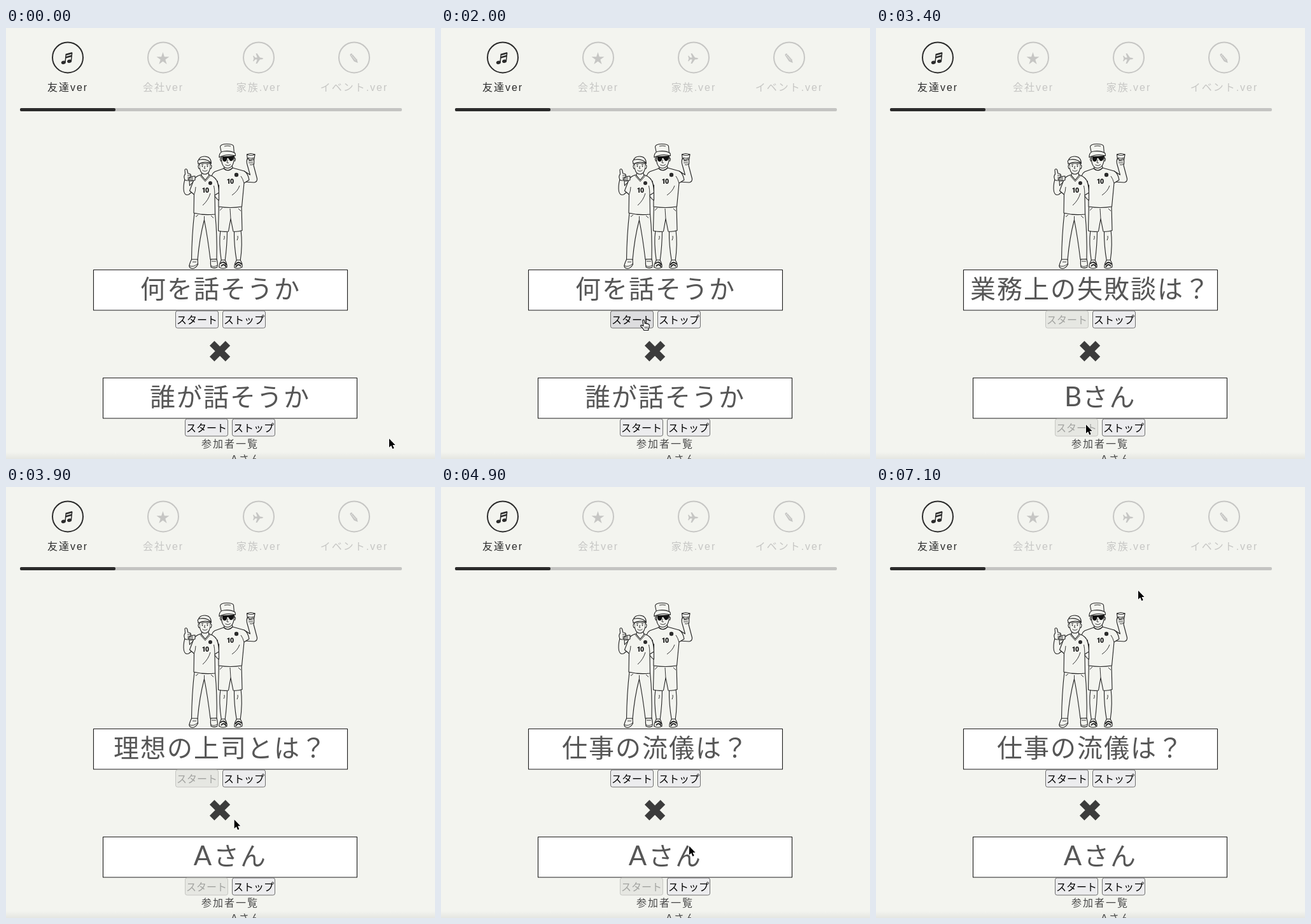
An HTML page with a canvas for the animation above (7.3 s loop, 674 by 678 pixels).

```html
<!DOCTYPE html>
<html lang="ja">
<head>
<meta charset="utf-8">
<title>Talk roulette</title>
<style>
html, body { margin: 0; width: 100%; height: 100%; overflow: hidden; background: #f3f4ef; }
canvas { display: block; }
</style>
</head>
<body>
<canvas id="stage" width="674" height="678"></canvas>
<script>
const ctx = document.getElementById('stage').getContext('2d');
const LOOP = 7300, STEP = 100;
const BG = '#f3f4ef', INK = '#2b2b2b', PALE = '#c6c6c4';
const CJK = '"Noto Sans CJK JP", "Noto Sans CJK", sans-serif';
const MIXED = '"Liberation Sans", ' + CJK;

const TOPICS = ['理想の上司とは？', '業務上の失敗談は？', '仕事の流儀は？'];
const TOP = { start: 2100, stop: 4500 };
const LOW = { start: 3200, stop: 6100 };

// Pointer stops: time, x, y
const TRACK = [
  [0, 602, 646], [300, 602, 646], [400, 603, 647], [500, 603, 647], [600, 603, 648],
  [900, 603, 648], [1000, 596, 643], [1200, 520, 590], [1400, 405, 514], [1700, 321, 474],
  [1800, 319, 465], [1900, 318, 459], [2200, 318, 459], [2500, 325, 487], [2600, 331, 520],
  [2700, 335, 555], [2800, 336, 588], [2900, 333, 612], [3100, 330, 624], [3500, 330, 624],
  [3700, 340, 590], [4000, 368, 490], [4200, 376, 463], [4500, 376, 463], [4700, 383, 493],
  [4900, 390, 565], [5000, 391, 600], [5200, 391, 625], [6800, 391, 625], [6900, 393, 575],
  [7000, 402, 380], [7100, 412, 163], [LOOP, 412, 163]
];

function pointerAt(t) {
  const i = Math.max(1, TRACK.findIndex(k => k[0] >= t));
  const [t0, x0, y0] = TRACK[i - 1], [t1, x1, y1] = TRACK[i];
  const p = (t - t0) / (t1 - t0);
  return { x: x0 + (x1 - x0) * p, y: y0 + (y1 - y0) * p };
}

function text(str, x, y, size, color, opt = {}) {
  ctx.font = `${opt.weight || 400} ${size}px ${opt.family || CJK}`;
  ctx.letterSpacing = (opt.gap || 0) + 'px';
  ctx.textAlign = 'left';
  ctx.fillStyle = color;
  const left = opt.left ? x : x - ctx.measureText(str).width / 2;
  ctx.fillText(str, left, y);
}

function line(d, width = 1.1, color = '#222', fill) {
  const p = new Path2D(d);
  if (fill) { ctx.fillStyle = fill; ctx.fill(p); }
  ctx.lineWidth = width;
  ctx.strokeStyle = color;
  ctx.stroke(p);
}

const shape = d => line(d, 1.1, '#222', BG);

function solid(d, color) {
  ctx.fillStyle = color;
  ctx.fill(new Path2D(d));
}

function ellipse(x, y, rx, ry, color, angle = 0) {
  ctx.beginPath();
  ctx.ellipse(x, y, rx, ry, angle, 0, Math.PI * 2);
  ctx.fillStyle = color;
  ctx.fill();
}

function roundBox(x, y, w, h, r, fill, stroke) {
  ctx.beginPath();
  ctx.roundRect(x, y, w, h, r);
  ctx.fillStyle = fill;
  ctx.fill();
  if (stroke) { ctx.lineWidth = 1; ctx.strokeStyle = stroke; ctx.stroke(); }
}

// --- Header tabs ---
const ICONS = [
  c => {
    ellipse(90.3, 54.3, 3.6, 2.6, c, -0.3);
    ellipse(99.6, 52.3, 3.6, 2.6, c, -0.3);
    line('M93 54L94.3 41M102.4 52L103.7 38.8', 1.5, c);
    line('M94 42L104 39.2M93.6 46.5L103.2 43.7', 2.5, c);
  },
  c => {
    ctx.beginPath();
    for (let i = 0; i < 10; i++) {
      const a = i * Math.PI / 5 - Math.PI / 2, r = i % 2 ? 4 : 10.5;
      ctx.lineTo(246.5 + r * Math.cos(a), 48.5 + r * Math.sin(a));
    }
    ctx.fillStyle = c;
    ctx.fill();
  },
  c => solid('M404.5 48Q403 46.4 399 46.4L394.5 40H392.5L394.7 46.4H391.5L389.3 43.8H388L389.4 48L388 52.2H389.3L391.5 49.6H394.7L392.5 56H394.5L399 49.6Q403 49.6 404.5 48Z', c),
  c => {
    solid('M540.5 43Q540 40.5 543 40L551.3 48.8L552.8 55L546.8 52.5Z', c);
    line('M542 44L545 41.2M543.8 44.3L549.2 50.8M546 42.8L551 49', 0.8, BG);
  }
];

function header() {
  ['友達ver', '会社ver', '家族.ver', 'イベント.ver'].forEach((label, i) => {
    const x = 97 + i * 150, c = i ? PALE : INK;
    ctx.beginPath();
    ctx.arc(x, 46.4, 24, 0, Math.PI * 2);
    ctx.lineWidth = 2;
    ctx.strokeStyle = c;
    ctx.stroke();
    ICONS[i](c);
    text(label, x, 99, 16, c, { gap: 2, family: MIXED, weight: 500 });
  });
  roundBox(22, 126, 600, 5, 2, '#c4c4c2');
  roundBox(22, 126, 150, 5, 2, INK);
}

// --- Line drawing of two friends ---
function tallFriend() {
  // legs, sandals, shorts
  shape('M337 318Q334 338 338.5 367H344Q347.5 342 347.5 318Z');
  shape('M358.5 318Q358 342 362.5 367H368Q372 340 369 318Z');
  shape('M338.5 365Q334 373 335 376.5Q341 380 347 376.5Q348 372 344 365Z');
  shape('M362.5 365Q358 372 359 377Q365 380 371 376Q372 371 368 365Z');
  line('M336.5 371Q342 365 346.5 373M338 375Q342 369 346 376M360 373Q365 365 370.5 372M361 376Q365 369 369 375', 1.8);
  line('M343 327Q344 331 342 333M364 327Q365 330 363 334', 0.9);
  shape('M334.5 280L333.5 319Q341 321 349.5 320L353 300L357 320Q364 321 371 318.5L370 280Z');
  line('M353 300L352 284M336 287L340 283M369 288L365 284', 0.9);
  // raised arm and cup
  shape('M378.5 199L380 212Q385 214 389 212L391 199Z');
  shape('M378.5 199Q384 196 391 199Q385 201.5 378.5 199Z');
  line('M379.3 204Q385 206 390.3 204', 0.9);
  shape('M374 225L383.5 231L379 215Q377 208 380 205L383 208L388.5 206Q391 210 389 216L394.5 237Q395 242 390 243L374 242Z');
  line('M381 209H388M381 212H388.5M383 215Q386 216 389 214', 0.9);
  // shirt and head
  shape('M342 221L328 226Q321 230 322 245L334 250V281Q353 284 370.5 281L374 244L382 239Q380 228 374 225L356 220Q348 227 342 221Z');
  line('M374 244Q372 237 369 233M367 248Q364 257 355 263M334 250L332 240', 0.9);
  shape('M343 213L342.5 221Q349 227 356 220L354.5 212Z');
  shape('M338.5 198Q337 220 348 220.5Q359.5 220 358.5 198Z');
  shape('M338 204Q335 205 338 210M359 204Q362 206 359 210');
  line('M348.5 207L347 212H350M344.5 215Q349 218 353 214.5', 0.9);
  solid('M339.5 202L358 201L357.8 205Q356.5 210 352 209L349 204.5L347.5 205Q347 211 342.5 210Q339.5 209 339.5 202Z', '#111');
  shape('M339 199L336.5 187Q337 182.5 347 182.5Q357 182.5 357.5 186L358.5 198Q348 196.5 339 199Z');
  shape('M335 201Q336 194.5 342 194Q353 192.5 360 197L360.5 201Q347 197 335 203.5Z');
  line('M343 186Q348 184.5 353 186', 0.9);
  ellipse(362, 231, 3.2, 3.2, INK);
  shirtNumber(352, 244.5);
}

function shirtNumber(x, y) {
  text('10', x, y, 10.5, '#111', { weight: 900, family: 'Roboto, sans-serif', gap: -0.8 });
}

function capFriend() {
  // legs and shoes
  shape('M296 291Q292 325 291.5 365H301Q304 330 311.5 302Q317 330 321 364H331Q332 325 328.5 292Z');
  line('M311.5 302V296M298 297L302 294M326 299L322 295', 0.9);
  shape('M291.5 364Q289 369 287.8 374Q288 378 293 378.5Q298 378 301.5 372L301 364Z');
  shape('M321.5 364Q321 371 322 376Q326 379 331.5 376.5Q333.5 373 331 363.5Z');
  line('M288 374Q294 377 301 371M322 374Q327 377 332 373M293 368H299M323 367H330', 0.9);
  // raised arm with thumb
  shape('M281 238Q278 249 279.5 257Q281 264 287 262L297 254L294 242L288.5 248L288 239Z');
  shape('M281 239Q278.5 233 281.5 230L281 223Q282.5 220.5 284.5 223L286 229Q291 229 290.5 233L289 239Q285 241 281 239Z');
  line('M285 232H290.5M285 235H290M285 237.5H289', 0.9);
  // far arm, shirt
  shape('M326 261Q331 270 334.5 271V247L327 246Z');
  shape('M306 231Q298 233 295 239L288.5 256L295.5 262L295 291Q311 295 328.5 293L328 263L334.5 259Q334 241 328 236Q325 233 319 231L313 239Z');
  line('M295.5 262Q298 256 298 250M328 263Q328 254 326.5 248M321 260Q318 271 309 279', 0.9);
  // head and cap
  shape('M308 225L307 232L313 239L319 232L317 225Z');
  line('M305 232.5L313 241.5L321 232.5', 0.9);
  shape('M304 213Q303.5 229.5 312.5 230Q321.5 229.5 321 213Z');
  shape('M304 215Q301 216 302.5 220Q303 222 304.5 221M321 215Q324 216 322.5 220Q322 222 320.5 221');
  ellipse(308.5, 217.5, 0.9, 1.1, '#111');
  ellipse(316.5, 217.5, 0.9, 1.1, '#111');
  line('M312.5 217L311.5 221H313.5M308.5 223.5Q312.5 227 316.5 223.5M307 215H310M315 215H318', 0.9);
  shape('M302 212Q302 202 312 202Q322 202 322.5 213Q312 207 302 212Z');
  shape('M302 212Q299.5 208 305 207Q316 205 322.5 213Q312 208.5 302 214Z');
  ellipse(321, 244, 3, 3, INK);
  shirtNumber(313, 258.5);
  // friend's hand on the shoulder
  shape('M297 233Q290 233 287.5 236Q286 240 289 240.5Q294 241 297 239Z');
  line('M288 236L294 235M287.5 238.2L294 237.5M288.5 240.2L294 239.8', 0.9);
}

// --- Roulette panels ---
function makeButtons(x, y, run) {
  return [
    { label: 'スタート', x, y, off: t => t >= run.start && t < run.stop },
    { label: 'ストップ', x: x + 74, y, off: () => false }
  ];
}
const BUTTONS = [...makeButtons(266.5, 445, TOP), ...makeButtons(281.5, 615, LOW)];

const hovers = (b, p, t) => !b.off(t) && p.x > b.x && p.x < b.x + 67 && p.y > b.y && p.y < b.y + 27.5;

function button(b, p, t) {
  const off = b.off(t);
  const fill = off ? '#e6e7e2' : hovers(b, p, t) ? '#dddddf' : '#ececee';
  roundBox(b.x, b.y, 67, 27, 3, fill, off ? '#c6c7c3' : '#6f6f6f');
  text(b.label, b.x + 33.5, b.y + 19.5, 16, off ? '#a2a3a0' : '#000', { weight: 500 });
}

function panel(x, y) {
  ctx.fillStyle = '#fff';
  ctx.fillRect(x, y, 399, 63.5);
  ctx.lineWidth = 1.1;
  ctx.strokeStyle = '#1c1c1c';
  ctx.strokeRect(x, y, 399, 63.5);
}

const big = (str, x, y) => text(str, x, y, 40, '#565656', { gap: 2 });

function topic(t) {
  if (t < TOP.start) return '何を話そうか';
  const n = Math.round((Math.min(t, TOP.stop - STEP) - TOP.start) / STEP);
  return TOPICS[n % 3];
}

function speaker(t) {
  if (t < LOW.start) return big('誰が話そうか', 352, 594.5);
  const n = Math.round((Math.min(t, LOW.stop - STEP) - LOW.start) / STEP) + 5;
  const isA = n % 7 % 2 === 1;
  text(isA ? 'A' : 'B', isA ? 309 : 309.5, 595, 42, '#565656', { family: 'Lato, sans-serif' });
  text('さん', isA ? 326 : 324.5, 594.5, 40, '#565656', { gap: 2, left: true });
}

function footer() {
  text('参加者一覧', 352, 659.5, 16, '#4a4a4a', { gap: 2 });
  text('Aさん', 353, 684, 16, '#4a4a4a', { gap: 2, left: true, family: MIXED });
  const g = ctx.createLinearGradient(0, 667, 0, 678);
  g.addColorStop(0, 'rgba(0,0,0,0)');
  g.addColorStop(1, 'rgba(0,0,0,0.06)');
  ctx.fillStyle = g;
  ctx.fillRect(0, 667, 674, 11);
}

function pointer(p, hand) {
  ctx.save();
  ctx.translate(p.x, p.y);
  if (hand) {
    line('M-1.2 1Q0 -0.8 1.3 1L2.3 6Q4 4.6 5 6.4Q6.6 5.2 7.4 7Q9.2 6.4 9.3 8.6Q9.5 12 7.8 14V16.5H0.8Q0 13.5 -4 10.5Q-5 8.4 -2.6 8.4L0 10Z', 1.2, '#111', '#fff');
    line('M2.4 10.5V14M4.4 10.5V14M6.3 10.5V14', 0.8, '#111');
  } else {
    const arrow = 'M0 0V13.8L3.2 10.8L5.4 16L7.7 15L5.5 10H9.6Z';
    line(arrow, 1.6, '#fff');
    solid(arrow, '#000');
  }
  ctx.restore();
}

function draw(now) {
  const t = Math.floor(now % LOOP / STEP) * STEP;
  const p = pointerAt(t);
  ctx.fillStyle = BG;
  ctx.fillRect(0, 0, 674, 678);
  ctx.lineJoin = 'round';
  header();
  tallFriend();
  capFriend();
  panel(137.5, 380.5);
  big(topic(t), 337, 424.5);
  line('M323.7 496L348.5 520.8M348.5 496L323.7 520.8', 10.5, '#3c3c3c');
  panel(152.5, 550.5);
  speaker(t);
  BUTTONS.forEach(b => button(b, p, t));
  footer();
  pointer(p, BUTTONS.some(b => hovers(b, p, t)));
  requestAnimationFrame(() => draw(performance.now()));
}
draw(performance.now());
</script>
</body>
</html>
```
